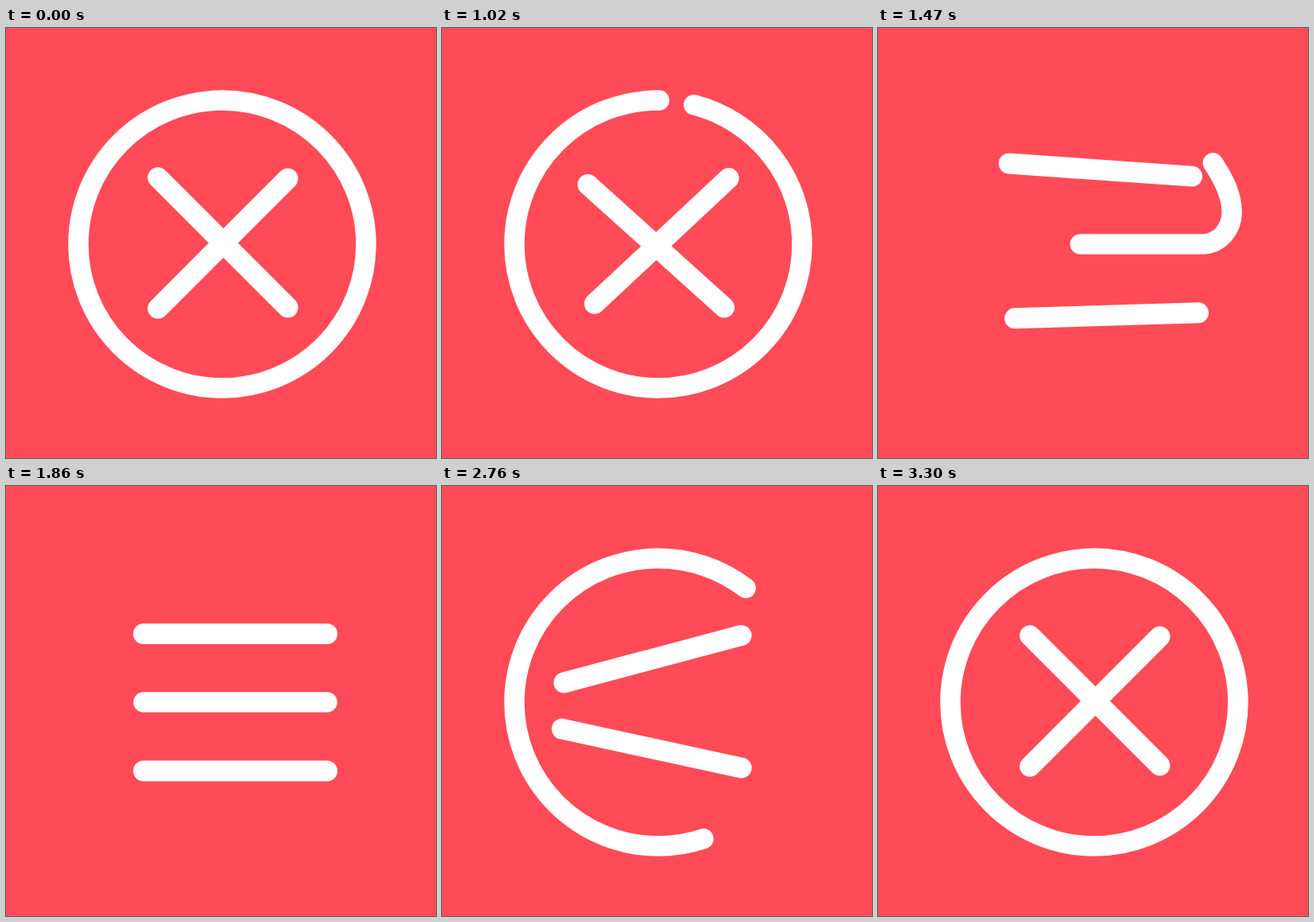
An HTML page that plays this animation: 541 by 541 pixels, repeating every 3.75 s.

```html
<!DOCTYPE html>
<html lang="en">
<head>
<meta charset="utf-8">
<title>Menu toggle</title>
<style>
  html, body { margin: 0; width: 100%; height: 100%; overflow: hidden; background: #ff4b57; }
  svg { display: block; width: 100vw; height: 100vh; }
  path, line { fill: none; stroke: #fff; stroke-linecap: round; }
  path { stroke-width: 25.5; }
  line { stroke-width: 26; }
</style>
</head>
<body>
<svg viewBox="0 0 541 541">
  <path id="ring"/>
  <line id="top" x2="-231"/>
  <line id="bottom" x2="-231"/>
</svg>
<script>
const LOOP = 3750;
const CX = 272, CY = 272, R = 181, JOIN = 33;
const rad = deg => deg * Math.PI / 180;
const $ = id => document.getElementById(id);
const ring = $('ring');

// Middle bar, hook, then counterclockwise round the circle to its top.
const jx = CX + R * Math.cos(rad(JOIN)), jy = CY - R * Math.sin(rad(JOIN));
ring.setAttribute('d', `M157 ${CY} H407 C430 ${CY} 445.5 253 445.2 230
  C444.5 210 436 192.5 ${jx} ${jy}
  A${R} ${R} 0 0 0 ${CX} ${CY - R}
  A${R} ${R} 0 0 0 ${CX} ${CY + R}
  A${R} ${R} 0 0 0 ${CX} ${CY - R}`);
const total = ring.getTotalLength();
const atAngle = deg => total - R * rad(450 - deg);
const atX = x => x - 157;

const inOut = n => u => u < .5 ? (2 * u) ** n / 2 : 1 - (2 - 2 * u) ** n / 2;
const sine = u => (1 - Math.cos(Math.PI * u)) / 2;
const cubic = inOut(3), quart = inOut(4);

// Cubic Bezier easing with both handles level.
function launch(u) {
  let lo = 0, hi = 1;
  for (let i = 0; i < 24; i++) {
    const p = (lo + hi) / 2, q = 1 - p;
    if (.45 * p * q * q + 1.65 * p * p * q + p ** 3 < u) lo = p; else hi = p;
  }
  return lo * lo * (3 - 2 * lo);
}

// Each step: start, end, value reached, easing.
const track = (first, ...steps) => t => {
  let v = first;
  for (const [a, b, to, ease] of steps) {
    if (t < a) break;
    if (t < b) return v + (to - v) * ease((t - a) / (b - a));
    v = to;
  }
  return v;
};

const head = track(total,
  [750, 1785, atX(394), u => quart(u * 1035 / 1080)],
  [1785, 1860, atX(404), sine],
  [2160, 2394, atX(394), sine],
  [2394, 3132, total, launch]);
const tail = track(atAngle(90),
  [946, 1757, atX(157), cubic],
  [1785, 1860, atX(173), sine],
  [2160, 2394, atX(157), sine],
  [2394, 2990, atAngle(90), launch]);

const bars = [
  {
    el: $('top'), dir: -1, open: 189.5, menu: 186,
    x: track(354.5, [810, 1726, 404, sine], [2430, 3050, 354.5, sine]),
    turn: track(45, [874, 1564, -4.5, cubic], [1564, 1720, 0, sine],
      [2430, 3210, 48.8, cubic], [3210, 3300, 45, sine])
  },
  {
    el: $('bottom'), dir: 1, open: 351.5, menu: 358.5,
    x: track(354.5, [925, 1582, 404, cubic], [2430, 3050, 354.5, sine]),
    turn: track(45, [843, 1551, -2, cubic], [1551, 1700, 0, sine],
      [2465, 3210, 48.8, cubic], [3210, 3300, 45, sine])
  }
];

function draw(t) {
  const from = tail(t), to = head(t);
  ring.setAttribute('stroke-dasharray', `${to - from} ${total * 2}`);
  ring.setAttribute('stroke-dashoffset', -from);
  for (const { el, dir, open, menu, x, turn } of bars) {
    const px = x(t);
    const py = open + (menu - open) * (px - 354.5) / 49.5;
    el.setAttribute('transform', `translate(${px} ${py}) rotate(${dir * turn(t)})`);
  }
}

const start = performance.now();
function tick() {
  draw((performance.now() - start) % LOOP);
  requestAnimationFrame(tick);
}
tick();
</script>
</body>
</html>
```
